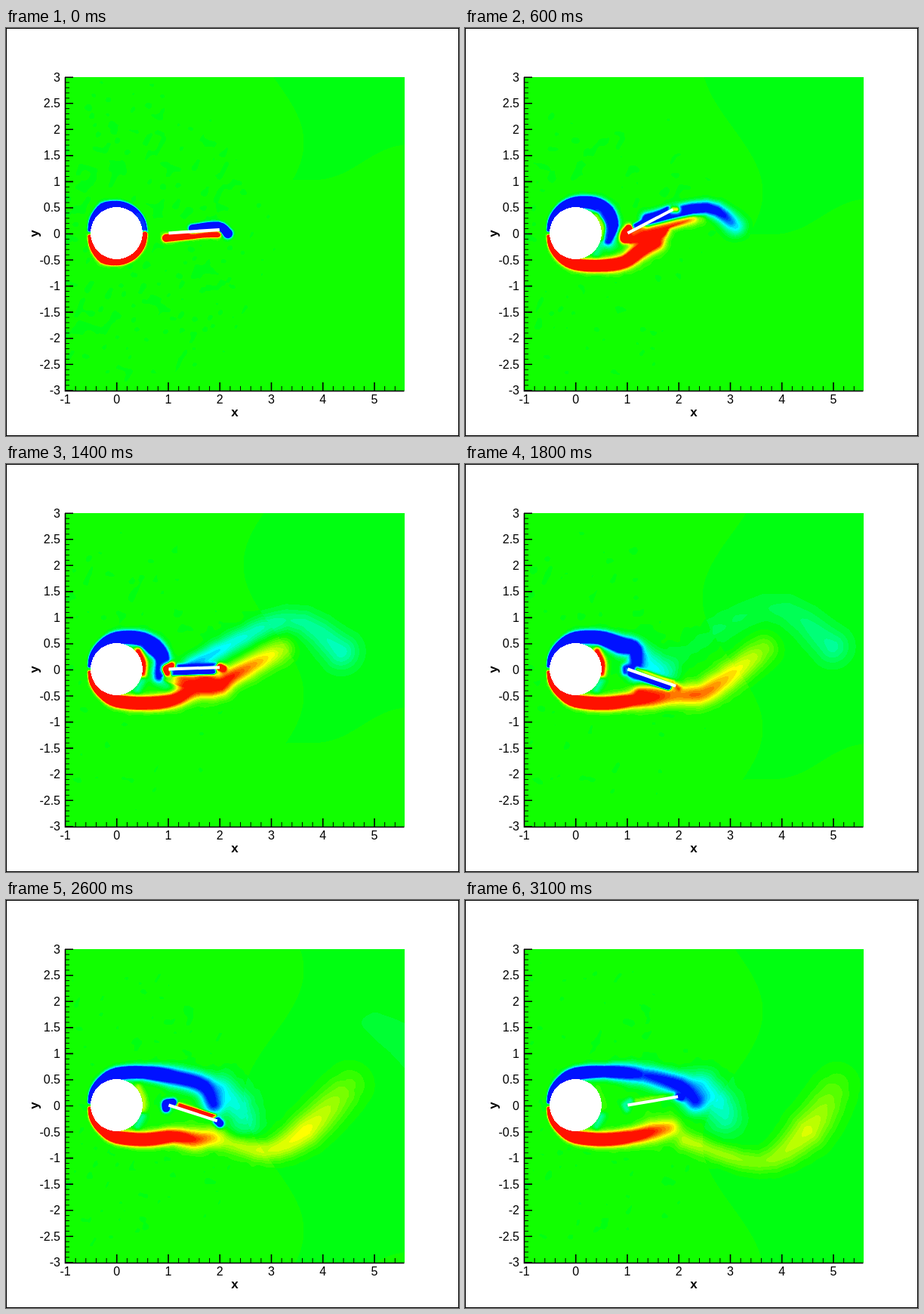
An HTML page with a canvas for the animation above (3200 ms loop, 600 px wide and 540 px high).

```html
<!DOCTYPE html>
<html lang="en">
<head>
<meta charset="utf-8">
<title>Vorticity behind a cylinder and a flapping plate</title>
<style>
html, body { margin: 0; width: 100%; height: 100%; overflow: hidden; background: #fff; }
#stage { position: relative; width: 600px; height: 540px; }
canvas { position: absolute; left: 79px; top: 65px; }
svg { position: absolute; left: 0; top: 0; }
text { font: 16px "Liberation Sans", Arial, sans-serif; }
.name { font-weight: bold; font-size: 17px; text-anchor: middle; }
</style>
</head>
<body>
<div id="stage">
  <canvas id="field" width="449" height="415"></canvas>
  <svg width="600" height="540" viewBox="0 0 600 540">
    <rect x=".5" y=".5" width="599" height="539" fill="none" stroke="#000"/>
    <circle cx="146.5" cy="271.5" r="34.5" fill="#fff" shape-rendering="crispEdges"/>
    <line id="plate" x1="215.5" y1="271.5" x2="283" y2="271.5" stroke="#fff" stroke-width="4"/>
    <path id="major" stroke="#000" stroke-width="1.6" fill="none"/>
    <path id="minor" stroke="#000" stroke-width="1" fill="none"/>
    <g id="labels"></g>
    <text class="name" x="303" y="514">x</text>
    <text class="name" transform="translate(43 272) rotate(-90)">y</text>
  </svg>
</div>
<script>
const W = 449, H = 415, LEFT = 79, TOP = 65, STEP = 100, STEPS = 32, BANDS = 15;
const { sin, cos, exp, abs, min, max, floor, round, PI } = Math;
const $ = id => document.getElementById(id);
const clamp = (v, lo = 0, hi = 1) => max(lo, min(hi, v));
const ease = u => { u = clamp(u); return u * u * (3 - 2 * u); };
const swing = (t, peak) => cos((t - peak) * PI / 15);
const grown = t => 1 - exp(-t / 4);
const plateAngle = t => 28 * sin((12 * t + 8) * PI / 180);

// Catmull-Rom through points [x, y, radius, strength]
function spline(pts, parts = 4) {
  const out = [], n = pts.length;
  for (let i = 0; i < n - 1; i++) {
    const a = pts[max(0, i - 1)], b = pts[i], c = pts[i + 1], d = pts[min(n - 1, i + 2)];
    const curve = (j, u) => {
      const c1 = c[j] - a[j], c2 = 2 * a[j] - 5 * b[j] + 4 * c[j] - d[j], c3 = 3 * (b[j] - c[j]) + d[j] - a[j];
      return b[j] + .5 * u * (c1 + u * (c2 + u * c3));
    };
    const line = (j, u) => b[j] + (c[j] - b[j]) * u;
    for (let s = 0; s < parts; s++) {
      const u = s / parts;
      out.push([curve(0, u), curve(1, u), line(2, u), line(3, u)]);
    }
  }
  out.push(pts[n - 1]);
  return out;
}

const value = new Float32Array(W * H), layer = new Float32Array(W * H);

// Lays a soft stroke over the field; sign picks blue (-1) or red (1).
function stroke(points, sign = 1) {
  const pts = spline(points);
  layer.fill(0);
  for (let i = 0; i < pts.length - 1; i++) {
    const [ax, ay, ar, aa] = pts[i], [bx, by, br, ba] = pts[i + 1];
    const dx = bx - ax, dy = by - ay, len2 = dx * dx + dy * dy || 1, pad = 2.5 * max(ar, br);
    const x0 = max(0, floor(min(ax, bx) - pad) - LEFT), x1 = min(W - 1, floor(max(ax, bx) + pad) - LEFT);
    const y0 = max(0, floor(min(ay, by) - pad) - TOP), y1 = min(H - 1, floor(max(ay, by) + pad) - TOP);
    for (let y = y0; y <= y1; y++) for (let x = x0; x <= x1; x++) {
      const px = x + LEFT + .5 - ax, py = y + TOP + .5 - ay;
      const u = max(0, min(1, (px * dx + py * dy) / len2));
      const ex = px - u * dx, ey = py - u * dy, r = ar + (br - ar) * u;
      const q = (ex * ex + ey * ey) / (r * r);
      if (q > 6.2) continue;
      const v = (aa + (ba - aa) * u) * exp(-q), j = y * W + x;
      if (abs(v) > abs(layer[j])) layer[j] = v;
    }
  }
  for (let j = 0; j < value.length; j++) {
    const v = layer[j] * sign;
    if (v) value[j] = value[j] * (1 - min(1, abs(v))) + clamp(v, -1, 1);
  }
}

// Mottled texture that fades away from the cylinder
function texture(seed, cell) {
  const rnd = (x, y) => { const s = sin(x * 127.1 + y * 311.7 + seed) * 43758.5453; return 2 * (s - floor(s)) - 1; };
  return Float32Array.from({ length: W * H }, (_, j) => {
    const x = j % W, y = floor(j / W);
    const gx = (x + y * .5) / cell, gy = (y - x * .35) / cell, ix = floor(gx), iy = floor(gy);
    const u = ease(gx - ix), v = ease(gy - iy);
    const a = rnd(ix, iy), b = rnd(ix + 1, iy), c = rnd(ix, iy + 1), d = rnd(ix + 1, iy + 1);
    const far = Math.hypot(x + LEFT - 147, y + TOP - 272) / 235;
    return (a + (b - a) * u + (c - a) * v + (a - b - c + d) * u * v) * max(0, 1 - far ** 6);
  });
}
const grainA = texture(3, 10), grainB = texture(8, 12);

function background(t) {
  const p = cos(t * .13), q = sin(t * .13), amp = .035 + .02 * exp(-t / 3);
  for (let y = 0, j = 0; y < H; y++) {
    const edge = 275 + 40 * sin(y / 55 - t / 5);
    for (let x = 0; x < W; x++, j++) {
      const faint = x > edge && y < 150 + 12 * t - .3 * (x - 266) + 8 * sin(x / 25);
      value[j] = clamp((faint ? -.03 : .025) + amp * (grainA[j] * p + grainB[j] * q), -.05, .06);
    }
  }
}

// Layer hugging the cylinder (s = 1 above, -1 below); its tail leaves the wall as it grows.
function shearLayer(t, s, tail) {
  const g = grown(t);
  const wall = (deg, dist, r, a) => [146.5 + dist * cos(deg * PI / 180), 271.5 - s * dist * sin(deg * PI / 180), r, a];
  const free = tail.map((pt, i) => wall(90 - 22 * i, 37.5, 4 - i / 3, 4).map((v, k) => v + (pt[k] - v) * g));
  stroke([wall(173, 36, 2, 3), wall(148, 37, 3, 3.5), wall(118, 38.5, 4.5, 4), ...free], -s);
}

function upperLayer(t) {
  const d = max(0, t - 12), k = min(1, d / 6);
  const end = [191 + 6 * d, 284 - d];
  const halo = (dx, dy, a) => [end[0] + dx * k, end[1] + dy * k, 10 + 11 * k, a * grown(t)];
  stroke([halo(10, -18, .5), halo(32, 4, .42), halo(40, 24, .3)], -1);
  shearLayer(t, 1, [
    [147, 230, 6.5, 4],
    [175 + .5 * d, 231 - .2 * d, 7.5, 4 - .1 * d],
    [192 + 2.3 * d, 243 - .6 * d, 9 + .2 * d, 4 * exp(-d / 13)],
    [199 + 4.5 * d, 262 - 16 * ease(d / 6), 8 + .35 * d, 1.1 + 2 * exp(-d / 5)],
    [...end, 6 + .5 * d, 1]
  ]);
}

function lowerLayer(t) {
  const sway = 16 * swing(t, 24);
  shearLayer(t, -1, [
    [147, 314, 6.5, 4],
    [185, 317, 8, 2.5],
    [222, 313, 10, 1.4],
    [250, 305 + sway * .8, 13, .95],
    [272, 300 + sway, 13, .6]
  ]);
}

// Red sheet shed under the plate, drifting downstream and decaying
function redWake(t) {
  const g = grown(t), free = ease((t - 13) / 8);
  stroke([
    [212 + 80 * ease((t - 13) / 15), 278 + 40 * free, 4 + 2 * g + 6 * free, .35 + 3.2 * (1 - free)],
    [246 + .15 * t * t, 274 - 10 * g + 3.2 * max(0, t - 5), 4 + 11 * (1 - exp(-t / 5)), 4.5 * exp(-t / 11)],
    [262 + .2 * t * t, 255 + 17 * exp(-t / 3) + 50 * ease((t - 6) / 16), 4 + .65 * t, 3.5 * exp(-t / 5) + 1.15 * exp(-t / 32)],
    [280 - 20 * g + 7.5 * t, 245 + 27 * exp(-t / 3), min(25, 4 + .85 * t), .65 * exp(-t / 20) + 3 * exp(-t)]
  ]);
}

// Starting vortex from the trailing edge, with the arm that links it to the plate
function blueWake(t, root) {
  stroke([
    [...root, 4 + .6 * t, 4 * exp(-t / 8) * clamp((20 - t) / 6)],
    [281 + 6.5 * t, 262 - 4 * t, 4 + .8 * t, 5 * exp(-t / 4.6)],
    [294 + 10.7 * t, 272 - 1.7 * t, min(22, 4.5 + 1.4 * t), .85 * exp(-t / 16) + 4 * exp(-t)]
  ], -1);
}

function paint(t) {
  const a = plateAngle(t) * PI / 180, c = cos(a), s = sin(a);
  const at = (along, up) => [215.5 + along * c - up * s, 271.5 - along * s - up * c];
  const body = (r, strength, ...pts) => stroke(pts.map(pt => [...pt, r, strength]));

  background(t);
  redWake(t);
  blueWake(t, at(32, 4));
  upperLayer(t);
  lowerLayer(t);

  body(5, 1.2 * exp(-(((t - 16) / 9) ** 2)), [175, 248], [182, 263], [181, 278]);
  body(5.5, -.3 * grown(t), [181, 286], [174, 299]);

  const started = 1 - exp(-t), turn = swing(t, 9) * started;
  body(3.5, -3.2 * exp(-(((t - 15) / 6.5) ** 4)), at(6, -4), at(58, -4));
  body(3, -2 * turn, at(12, 4), at(62, 4));
  body(4.5, 3 * turn, at(-2, -5), at(-4, 1), at(4, 5));
  body(4.5, 2.5 * swing(t, 12) * started, at(68, 0), at(72, -2));

  const img = new ImageData(W, H), px = new Uint32Array(img.data.buffer);
  for (let j = 0; j < px.length; j++)
    px[j] = palette[clamp(floor((value[j] + 1) * BANDS), 0, 2 * BANDS - 1)];
  return img;
}

// Blue, cyan, green, yellow, red in flat bands
const palette = Uint32Array.from({ length: 2 * BANDS }, (_, i) => {
  const v = (i + .5) / BANDS - 1, m = abs(v);
  const main = round(255 * min(1, 2 * m)), green = round(255 * min(1, 2 - 2 * m));
  return (255 << 24 | (v < 0 ? main << 16 : main) | green << 8) >>> 0;
});

function axes() {
  const X = v => 146.75 + 68.25 * v, Y = v => 272.5 - 69.1 * v;
  let major = "M78.5 65V480.5H527.5", minor = "", labels = "";
  for (let i = -30; i <= 30; i++) {
    const y = Y(i / 10);
    if (i % 5) minor += `M78 ${y}h6`;
    else {
      major += `M78 ${y}h11`;
      labels += `<text x="72" y="${y + 5.5}" text-anchor="end">${i / 10}</text>`;
    }
  }
  for (let i = -5; i <= 27; i++) {
    const x = X(i / 5);
    if (i % 5) minor += `M${x} 480v-6`;
    else {
      major += `M${x} 480v-11`;
      labels += `<text x="${x}" y="497" text-anchor="middle">${i / 5}</text>`;
    }
  }
  $("major").setAttribute("d", major);
  $("minor").setAttribute("d", minor);
  $("labels").innerHTML = labels;
}

const ctx = $("field").getContext("2d"), cache = [];
let shown = -1;

function draw() {
  const t = floor(performance.now() / STEP) % STEPS;
  if (t !== shown) {
    shown = t;
    ctx.putImageData(cache[t] ||= paint(t), 0, 0);
    $("plate").setAttribute("transform", `rotate(${-plateAngle(t)} 215.5 271.5)`);
  }
  requestAnimationFrame(draw);
}

axes();
draw();
</script>
</body>
</html>
```
